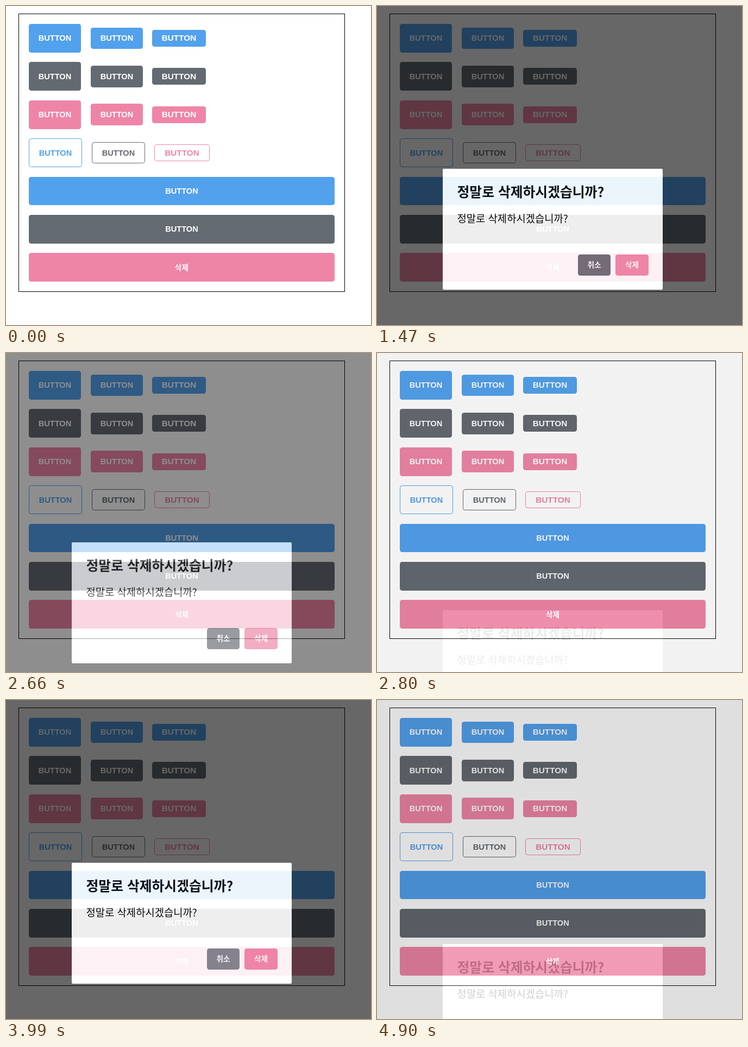
Animation of 672x588 px, one loop 4.97 s. Source, as an HTML page:

```html
<!DOCTYPE html>
<html lang="ko">
<head>
<meta charset="utf-8">
<title>Buttons and dialog</title>
<style>
  html, body { margin: 0; width: 100%; height: 100%; overflow: hidden; background: #fff; }
  svg { display: block; width: 672px; height: 588px; }
  text { font-family: "Liberation Sans", Arial, sans-serif; font-weight: 700; }
  .ko { font-family: "Noto Sans CJK KR", "Noto Sans CJK", sans-serif; }
</style>
</head>
<body>
<svg id="stage" viewBox="0 0 672 588"></svg>
<script>
const LOOP = 4970, STEP = 70;      // ms; the picture advances in fixed steps
const FADE = 250, SLIDE = 213;     // dialog transition: ms and px
const DELETE = '삭제', QUESTION = '정말로 삭제하시겠습니까?';
const BLUE = '#52a1ec', WHITE = '#fff';
const GRAY = { normal: '#646a71', hover: '#7a828b', active: '#4c5157' };
const PINK = { normal: '#ee85a6', hover: '#f4a9c4', active: '#ed6288' };
const COLORS = [BLUE, GRAY.normal, PINK.normal];

const stage = document.getElementById('stage');

function add(parent, tag, attrs, text = '') {
  const el = document.createElementNS('http://www.w3.org/2000/svg', tag);
  for (const name in attrs) el.setAttribute(name, attrs[name]);
  el.textContent = text;
  return parent.appendChild(el);
}

function box(parent, x0, y0, x1, y1, attrs) {
  return add(parent, 'rect', { x: x0, y: y0, width: x1 - x0, height: y1 - y0, ...attrs });
}

function button(parent, x0, x1, mid, half, color, { label = 'BUTTON', size = 14.58, outline = false } = {}) {
  const top = Math.round(mid - half), bottom = Math.round(mid + half);
  const korean = label !== 'BUTTON';
  const rect = outline
    ? box(parent, x0 + .5, top + .5, x1 - .5, bottom - .5, { rx: 4, fill: 'none', stroke: color })
    : box(parent, x0, top, x1, bottom, { rx: 4.4, fill: color });
  add(parent, 'text', {
    x: (x0 + x1) / 2, y: Math.round(mid + 5), 'text-anchor': 'middle',
    'font-size': korean ? 13.6 : size, class: korean ? 'ko' : '',
    fill: outline ? color : WHITE
  }, label);
  return rect;
}

// Page
box(stage, 23.5, 14.5, 623.5, 526.5, { fill: 'none', stroke: '#000' });
const rowMid = i => 59.42 + 70.38 * i;
const HALVES = [26.32, 19.75, 15.4];
const SPANS = [[42, 138], [156, 252], [269, 368]];
const OUTLINE_SPANS = [[42, 140], [158, 256], [273, 375]];

for (let row = 0; row < 4; row++) {
  const outline = row === 3;
  HALVES.forEach((half, col) => {
    const [x0, x1] = (outline ? OUTLINE_SPANS : SPANS)[col];
    button(stage, x0, x1, rowMid(row), half, COLORS[outline ? col : row],
      { size: col === 2 ? 15.3 : 14.58, outline });
  });
}
button(stage, 42, 605, rowMid(4), HALVES[0], BLUE);
button(stage, 42, 605, rowMid(5), HALVES[0], GRAY.normal);
const remove = button(stage, 42, 605, rowMid(6), HALVES[0], PINK.normal, { label: DELETE });

// Dialog
const overlay = add(stage, 'g', {});
box(overlay, 0, 0, 672, 588, { fill: '#000', 'fill-opacity': .667 });
const dialog = add(overlay, 'g', {});
box(dialog, 121, 277, 526, 500, { rx: 2.2, fill: WHITE });
add(dialog, 'text', { x: 147.5, y: 329, class: 'ko', 'font-size': 24.8 }, QUESTION);
add(dialog, 'text', { x: 147.5, y: 376, class: 'ko', 'font-size': 18.8, style: 'font-weight:400' }, QUESTION);
const cancel = button(dialog, 370, 430, 454.4, 19.75, GRAY.normal, { label: '취소' });
const confirm = button(dialog, 439, 500, 454.4, 19.75, PINK.normal, { label: DELETE });

// Timeline: [start, state] for each button, [open, close] for each dialog
const REMOVE = [[560, 'hover'], [1050, 'active'], [1230, 'hover'], [1300, 'normal'],
  [2920, 'hover'], [3640, 'active'], [3760, 'hover'], [3820, 'normal']];
const CANCEL = [[2100, 'hover'], [2520, 'active'], [2590, 'hover'], [2640, 'normal'],
  [3970, 'hover'], [4250, 'normal']];
const CONFIRM = [[4320, 'hover'], [4620, 'active'], [4742, 'normal']];
const DIALOGS = [[1288, 2605], [3808, 4742]];

function stateAt(track, t) {
  let state = 'normal';
  for (const [start, next] of track) if (t >= start) state = next;
  return state;
}

// cubic-bezier(0, 0, .58, 1)
function easeOut(x) {
  if (x <= 0) return 0;
  if (x >= 1) return 1;
  let lo = 0, hi = 1;
  for (let i = 0; i < 24; i++) {
    const s = (lo + hi) / 2;
    if (1.74 * s * s - .74 * s ** 3 < x) lo = s; else hi = s;
  }
  return lo * lo * (3 - 2 * lo);
}

function draw(t) {
  let shown = 0;
  for (const [open, close] of DIALOGS)
    shown += easeOut((t - open) / FADE) - easeOut((t - close) / FADE);
  overlay.setAttribute('visibility', shown > 0 ? 'visible' : 'hidden');
  overlay.setAttribute('opacity', shown);
  dialog.setAttribute('transform', `translate(0 ${Math.round(SLIDE * (1 - shown))})`);
  remove.setAttribute('fill', PINK[stateAt(REMOVE, t)]);
  cancel.setAttribute('fill', GRAY[stateAt(CANCEL, t)]);
  confirm.setAttribute('fill', PINK[stateAt(CONFIRM, t)]);
}

const begin = performance.now();
function tick() {
  const t = (performance.now() - begin) % LOOP;
  draw(Math.floor(t / STEP) * STEP);
  requestAnimationFrame(tick);
}
tick();
</script>
</body>
</html>
```
